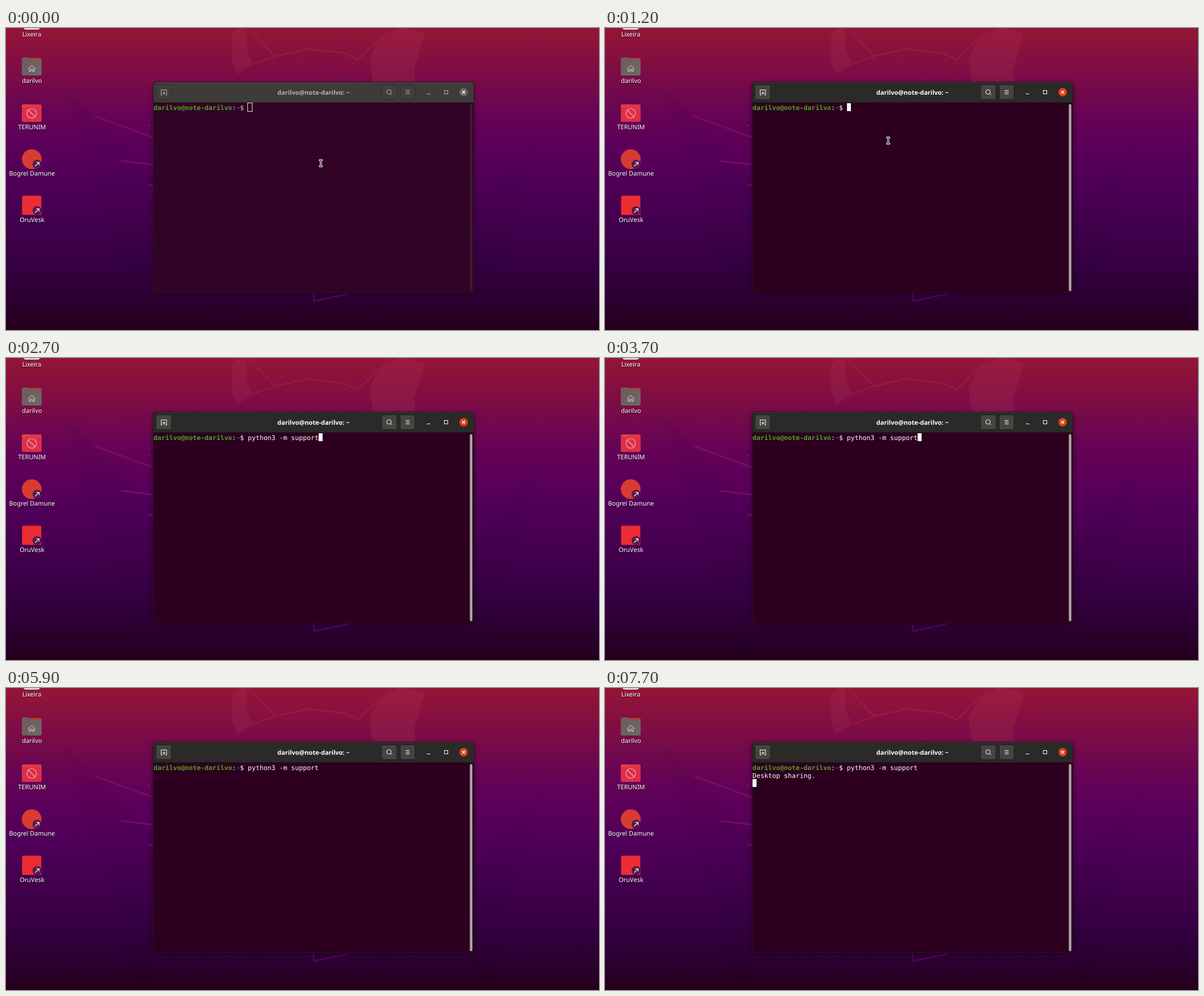
An HTML page that plays this animation: 1049 px wide and 534 px high, repeating every 8000 ms.

```html
<!DOCTYPE html>
<html lang="pt">
<head>
<meta charset="utf-8">
<title>Terminal</title>
<style>
  html, body { margin: 0; width: 100%; height: 100%; overflow: hidden; background: #24001c; }
  svg { display: block; width: 1049px; height: 534px; text-rendering: geometricPrecision;
    --bar: #3d3c39; --edge: #2d2b29; --button: #403f3b; --body: #310425; --ink: #b5b2ad;
    --close: #666561; --scroll: #421633; --prompt: #d8d0d5; --shadow: .35; }
  svg.focused { --bar: #2b2a28; --edge: #1f1e1c; --button: #454440; --body: #2c001e; --ink: #fff;
    --close: #dc3f16; --scroll: #aaa4a7; --prompt: #fff; --shadow: .5; }
  text { white-space: pre; }
  .label { font: 11px "Noto Sans", "Open Sans", sans-serif; fill: #fff; text-anchor: middle;
    filter: drop-shadow(0 1px 1px #0009); }
  .title { font: bold 11px "Noto Sans", "Open Sans", sans-serif; fill: var(--ink); text-anchor: middle; }
  .term { font: 11.55px "DejaVu Sans Mono", monospace; fill: var(--prompt); }
  .term .user { font-weight: bold; fill: #50a027; }
  .term .dir { font-weight: bold; fill: #315f9b; }
  .button { fill: var(--button); stroke: var(--edge); }
  .glyph { fill: none; stroke: var(--ink); }
  .line { fill: none; stroke-linejoin: round; stroke-linecap: round; }
  .shadow { opacity: var(--shadow); }
</style>
</head>
<body>
<svg id="stage" viewBox="0 0 1049 534">
  <defs>
    <linearGradient id="sky" x2="0" y2="1">
      <stop offset="0" stop-color="#941636"/>
      <stop offset=".1" stop-color="#850f40"/>
      <stop offset=".2" stop-color="#740a4b"/>
      <stop offset=".3" stop-color="#650355"/>
      <stop offset=".4" stop-color="#5b005a"/>
      <stop offset=".5" stop-color="#500058"/>
      <stop offset=".65" stop-color="#43004d"/>
      <stop offset=".78" stop-color="#360043"/>
      <stop offset=".88" stop-color="#2d0034"/>
      <stop offset="1" stop-color="#24001c"/>
    </linearGradient>
    <linearGradient id="ear" x2="0" y2="1">
      <stop offset="0" stop-color="#9c1c3c"/>
      <stop offset="1" stop-color="#84164b"/>
    </linearGradient>
    <linearGradient id="folder" x2="1" y2="1">
      <stop offset="0" stop-color="#6f5a5c"/>
      <stop offset="1" stop-color="#6b6a65"/>
    </linearGradient>
    <filter id="blur" x="-10%" y="-10%" width="120%" height="120%"><feGaussianBlur stdDeviation="4"/></filter>
    <g id="shortcut">
      <circle r="8" fill="#57194c"/>
      <path d="M-3.5 3.5L3.5-3.5M-1.5-3.5H3.5V1.5" fill="none" stroke="#fff" stroke-width="1.1"/>
    </g>
  </defs>

  <!-- Wallpaper -->
  <rect width="1049" height="534" fill="url(#sky)"/>
  <g fill="#1d0030" opacity=".05">
    <path d="M100 100L260 260V500L240 534Z"/>
    <path d="M945 190L828 325V470L850 534Z"/>
  </g>
  <g fill="url(#ear)">
    <path d="M400 10L414 0H425L426 40L437 64L409 82L400 61Z"/>
    <path d="M661 19L694 0H709L741 10L722 72L724 96H649L643 52Z"/>
  </g>
  <g class="line" stroke="#941b42">
    <path d="M429 0L476 50L533 37L597 44L622 56L661 19L681 0" stroke-width="3"/>
    <path d="M437 64L476 50" stroke-width="2"/>
    <path d="M476 50L457 96M533 37L500 96M597 44L614 96M622 56L614 96M622 56L558 96" opacity=".5"/>
  </g>
  <g class="line" stroke="#750d60" stroke-width="3">
    <path d="M158 156L262 194M205 235L262 242M254 278L262 277"/>
    <path d="M253 172v1" stroke="#a33a80" stroke-width="1.5"/>
    <path d="M543 464L545 483L606 470" stroke="#4b035c"/>
  </g>

  <!-- Desktop icons -->
  <path d="M31 0H60Q59 3 56 3H35Q32 3 31 0Z" fill="#d5d0d2"/>
  <path d="M43 53H61Q63 53 63 56V64H43Z" fill="#b6402e"/>
  <path d="M28 55Q28 52 31 52H40L44 56H60Q63 56 63 59V81Q63 84 60 84H31Q28 84 28 81Z" fill="url(#folder)"/>
  <path d="M39.5 72L45.5 66L51.5 72M41 71V76.500H44V73H47V76.500H50V71" fill="none" stroke="#e2dedb"/>
  <rect x="28" y="135" width="35" height="31" rx="3" fill="#dd3048"/>
  <path d="M28 139Q28 135 31 135H41L44 138H63V140H28Z" fill="#e23b4c"/>
  <circle cx="45.500" cy="151" r="8.500" fill="none" stroke="#f4a9b0" stroke-width="1.200"/>
  <path d="M39.500 145L51.500 157" stroke="#f4a9b0" stroke-width="1.200"/>
  <circle cx="45.500" cy="232" r="17.500" fill="#d83b31"/>
  <use href="#shortcut" x="55" y="241"/>
  <rect x="28.500" y="296.500" width="34" height="34" rx="2" fill="#eb2d33"/>
  <use href="#shortcut" x="55" y="323"/>
  <g class="label">
    <text x="45.500" y="15">Lixeira</text>
    <text x="46" y="97">darilvo</text>
    <text x="46" y="179">TERUNIM</text>
    <text x="46" y="261">Bogrel Damune</text>
    <text x="46" y="343">OruVesk</text>
  </g>

  <!-- Window -->
  <rect class="shadow" x="260" y="98" width="568" height="371" rx="6" filter="url(#blur)"/>
  <path d="M260 468V102Q260 95 267 95H821Q828 95 828 102V468Z" fill="#2b1427"/>
  <path d="M261 132V102Q261 96 267 96H821Q827 96 827 102V132Z" fill="var(--bar)"/>
  <path d="M266 96.500H822" stroke="#fff" opacity=".07"/>
  <rect x="261" y="132" width="566" height="335" fill="var(--body)"/>
  <path d="M261 131.500H827" stroke="var(--edge)"/>
  <g class="button">
    <rect x="265.500" y="100.500" width="27" height="26" rx="3"/>
    <rect x="664.500" y="100.500" width="27" height="26" rx="3"/>
    <rect x="697.500" y="100.500" width="26" height="26" rx="3"/>
  </g>
  <circle cx="809.500" cy="113.500" r="7.500" fill="var(--close)"/>
  <g class="glyph">
    <path d="M274 118.500H276.500M282 118.500H284.500M274.500 118V109.500H284V118M279.300 112V118M276.300 115H282.300"/>
    <circle cx="677.500" cy="113" r="4"/>
    <path d="M680.500 116L683 118.500"/>
    <path d="M707 110.500H714M707 113.500H714M707 116.500H714"/>
    <path d="M744.500 116.500H750.500"/>
    <rect x="775.500" y="110.500" width="6" height="6"/>
    <path d="M806.700 110.700L812.300 116.300M812.300 110.700L806.700 116.300" stroke="#fff" stroke-width="1.400"/>
  </g>
  <text class="title" x="544" y="117.500">darilvo@note-darilvo: ~</text>
  <rect x="820.500" y="134.500" width="4.500" height="331" rx="2.200" fill="var(--scroll)"/>

  <!-- Terminal -->
  <g class="term">
    <text x="261" y="144.500"><tspan class="user">darilvo@note-darilvo</tspan>:<tspan class="dir">~</tspan>$ <tspan id="command"></tspan></text>
    <text id="output" x="261" y="158.500"></text>
  </g>
  <rect id="hollow" x="427.500" y="132.500" width="8" height="15" fill="none" stroke="#e6dfe4"/>
  <rect id="block" width="7" height="14" fill="var(--prompt)"/>
  <g id="mouse" class="line">
    <path d="M-2-5.500H2M0-5.500V5.500M-2 5.500H2" stroke="#fff" stroke-width="3.200"/>
    <path d="M-2-5.500H2M0-5.500V5.500M-2 5.500H2" stroke="#16000f" stroke-width="1.100"/>
  </g>
</svg>
<script>
const LOOP = 8000;
const el = id => document.getElementById(id);
const show = (id, on) => el(id).setAttribute('visibility', on ? 'visible' : 'hidden');
const place = (id, [x, y]) => el(id).setAttribute('transform', `translate(${x} ${y})`);
const latest = (steps, t) => steps.filter(([start]) => start <= t).pop()[1];

// Each track holds [start ms, value] steps.
const mousePath = [[0, [557, 239]], [700, [541, 223]], [900, [501, 199]]];
const cursorPath = [[0, [428, 133]], [2700, [553, 133]], [5400, [261, 147]], [6700, [261, 161]]];
const blink = [[0, false], [1100, true], [1700, false], [2200, true], [3200, false], [3700, true],
  [4400, false], [5000, true], [5900, false], [6500, true], [7100, false], [7700, true]];

function draw(t) {
  el('stage').classList.toggle('focused', t >= 1200);
  el('command').textContent = t >= 2700 ? 'python3 -m support' : '';
  el('output').textContent = t >= 6700 ? 'Desktop sharing.' : '';
  show('hollow', t < 1100);
  show('block', latest(blink, t));
  place('block', latest(cursorPath, t));
  show('mouse', t < 2400);
  place('mouse', latest(mousePath, t));
}

function tick() {
  draw(performance.now() % LOOP);
  requestAnimationFrame(tick);
}
tick();
</script>
</body>
</html>
```
